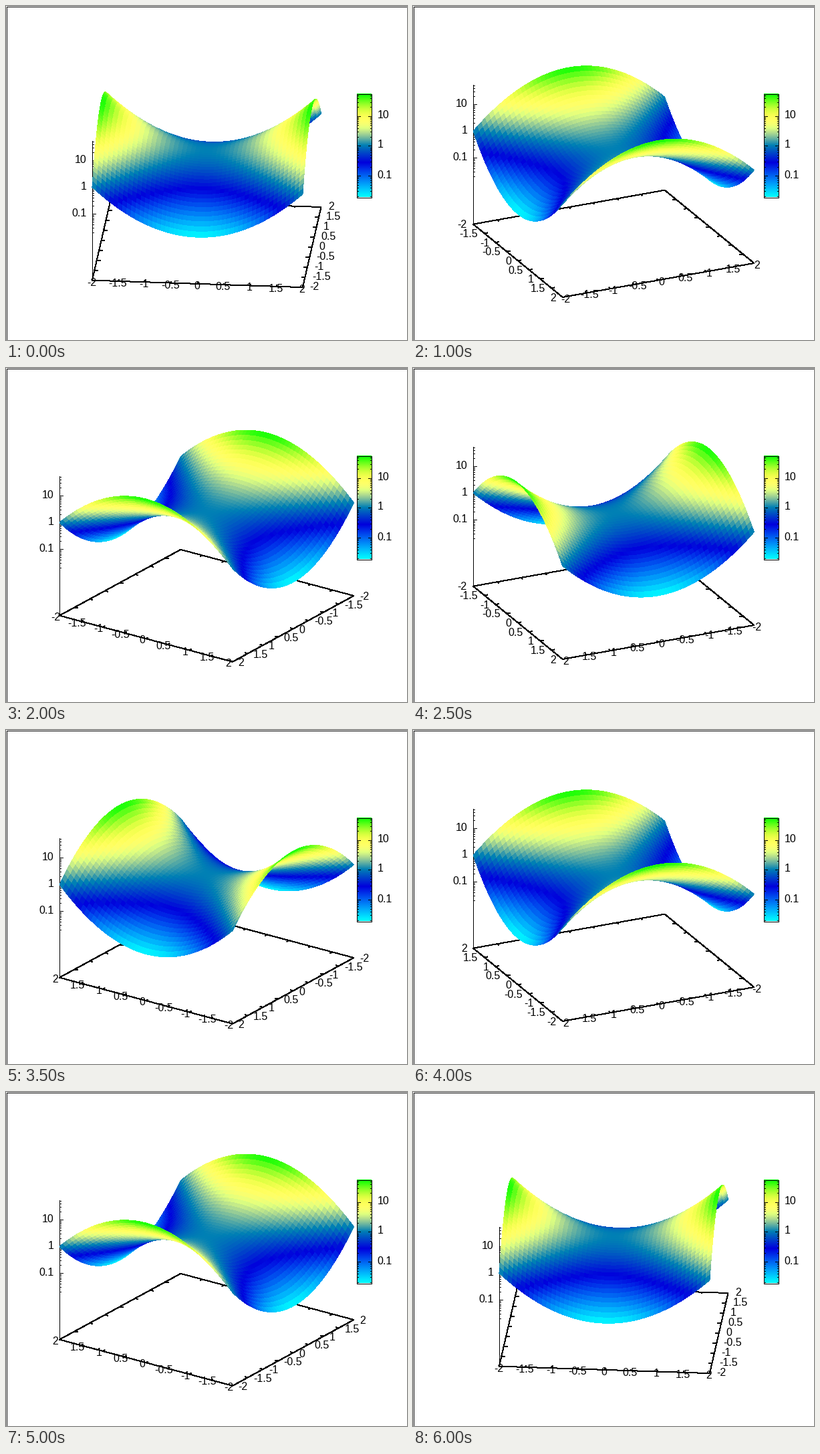
Recreate the animation shown at these times as a matplotlib script. Size 600 by 500 pixels, loop 6500 ms.

```python
import numpy as np
import matplotlib.pyplot as plt
from matplotlib.animation import FuncAnimation
from matplotlib.collections import LineCollection, PolyCollection
from matplotlib.patches import Rectangle

W, H, DPI = 600, 500, 100
PX = 72 / DPI                  # one pixel in points
FRAMES, INTERVAL = 13, 500
CX, CY = 299.7, 355.3          # centre of the base
SX, SY, SZ = 316.2, 120.6, 139.4   # lengths of the x/y, tilted and z spans
LABEL_GAP, TICK = 0.033, 0.0167
GRID = 50
BAR = (524, 131, 546, 286)     # left, top, right, bottom

fig = plt.figure(figsize=(W / DPI, H / DPI), dpi=DPI, facecolor="white")
ax = fig.add_axes([0, 0, 1, 1])
ax.set_axis_off()


def palette(t):
    t = np.asarray(t, float)
    rgb = [-np.sin(2 * np.pi * t), np.abs(3 * t - 1), np.cos(np.pi * t / 2)]
    return np.clip(np.stack(rgb, axis=-1), 0, 1)


def level(v):
    """Position of a value on the log scale from e^-4 to e^4."""
    return (np.log(v) + 4) / 8


def project(x, y, h, a):
    c, s = np.cos(a), np.sin(a)
    px = CX + SX * (x * c + y * s) / 4
    py = CY + SY * (x * s - y * c) / 4 - SZ * h
    return np.stack([px, py], axis=-1)


def make_text(x=0, y=0, s="", ha="left"):
    return ax.text(x, y + 5, s, ha=ha, va="baseline", color="black",
                   family="Liberation Sans", fontsize=16 * PX, zorder=4)


def place(text, x, y, s, ha):
    text.set_position((x, y + 5))
    text.set_text(s)
    text.set_ha(ha)


# Surface z = exp(x^2 - y^2)
axis = np.linspace(-2, 2, GRID)
X, Y = np.meshgrid(axis, axis)
T = (X ** 2 - Y ** 2 + 4) / 8


def corners(g):
    return np.stack([g[:-1, :-1], g[:-1, 1:], g[1:, 1:], g[1:, :-1]], axis=2)


QX, QY, QT = (corners(g).reshape(-1, 4) for g in (X, Y, T))
COLORS = palette(QT.mean(axis=1))

log_ticks = [(m * 10.0 ** e, m == 1) for e in range(-2, 2) for m in range(1, 10)]
log_ticks = [(v, major) for v, major in log_ticks if 0 < level(v) < 1]
steps = np.arange(-2, 2.1, 0.5)

surface = PolyCollection([], linewidths=0, antialiaseds=False, zorder=2)
frame_lines = LineCollection([], colors="black", linewidths=PX,
                             antialiaseds=False, zorder=1)
ax.add_collection(surface)
ax.add_collection(frame_lines)
floor_labels = [make_text() for _ in range(2 * len(steps))]
z_labels = [make_text() for _ in range(3)]


def draw_bar():
    x0, y0, x1, y1 = BAR
    grad = palette(np.linspace(1, 0, y1 - y0))[:, None, :]
    ax.imshow(grad, extent=(x0, x1, y1, y0), aspect="auto",
              interpolation="nearest", zorder=2)
    ticks = []
    for v, major in log_ticks:
        y = round(y1 - (y1 - y0) * level(v))
        n = 5 if major else 2
        ticks += [[(x0, y), (x0 + n, y)], [(x1 - n, y), (x1, y)]]
        if major:
            make_text(555, y - 1, f"{v:g}")
    ax.add_collection(LineCollection(ticks, colors="black", linewidths=PX,
                                     antialiaseds=False, zorder=3))
    for x, y, w, h in ((x0, y0, x1 - x0, y1 - y0), (0, 0, W - 1, H - 1)):
        ax.add_patch(Rectangle((x, y), w, h, fill=False, ec="black", lw=PX,
                               antialiased=False, zorder=3))


def update(i):
    a = np.radians(5 + 30 * i)
    c, s = np.cos(a), np.sin(a)

    # far quads first
    order = np.argsort((QX * s - QY * c).mean(axis=1), kind="stable")
    surface.set_verts(project(QX, QY, QT + 0.5, a)[order])
    surface.set_facecolor(COLORS[order])

    ring = np.array([(-2, -2), (2, -2), (2, 2), (-2, 2), (-2, -2)])
    base = project(ring[:, 0], ring[:, 1], 0, a)
    lines = [base[k:k + 2] for k in range(4)]

    labels = iter(floor_labels)
    vx, vy = np.array([SX * c, SY * s]), np.array([SX * s, -SY * c])
    for is_x, across in ((True, vy), (False, vx)):
        near = 2 if across[1] > 0 else -2
        for side in (-2, 2):
            out = across * np.sign(side)
            for v in steps:
                x, y = (v, side) if is_x else (side, v)
                p = project(x, y, 0, a)
                lines.append([p, p - out * TICK])
                if side != near:
                    continue
                q = p + out * LABEL_GAP
                lean = out[0] / SX
                ha = "left" if lean > 0.7 else "right" if lean < -0.7 else "center"
                place(next(labels), q[0], q[1] - 1, f"{v:g}", ha)

    # z axis stands on the leftmost corner
    zx, zy = base[np.argmin(base[:, 0])]
    lines.append([(zx, zy), (zx, zy - 1.5 * SZ)])
    labels = iter(z_labels)
    for v, major in log_ticks:
        y = zy - SZ * (0.5 + level(v))
        lines.append([(zx, y), (zx + (5 if major else 2), y)])
        if major:
            place(next(labels), zx - 8.5, y - 1, f"{v:g}", "right")
    frame_lines.set_segments(lines)
    return [surface, frame_lines, *floor_labels, *z_labels]


draw_bar()
ax.set_xlim(-0.5, W - 0.5)
ax.set_ylim(H - 0.5, -0.5)

anim = FuncAnimation(fig, update, frames=FRAMES, interval=INTERVAL,
                     repeat=True, repeat_delay=0, blit=False)
plt.show()
```
